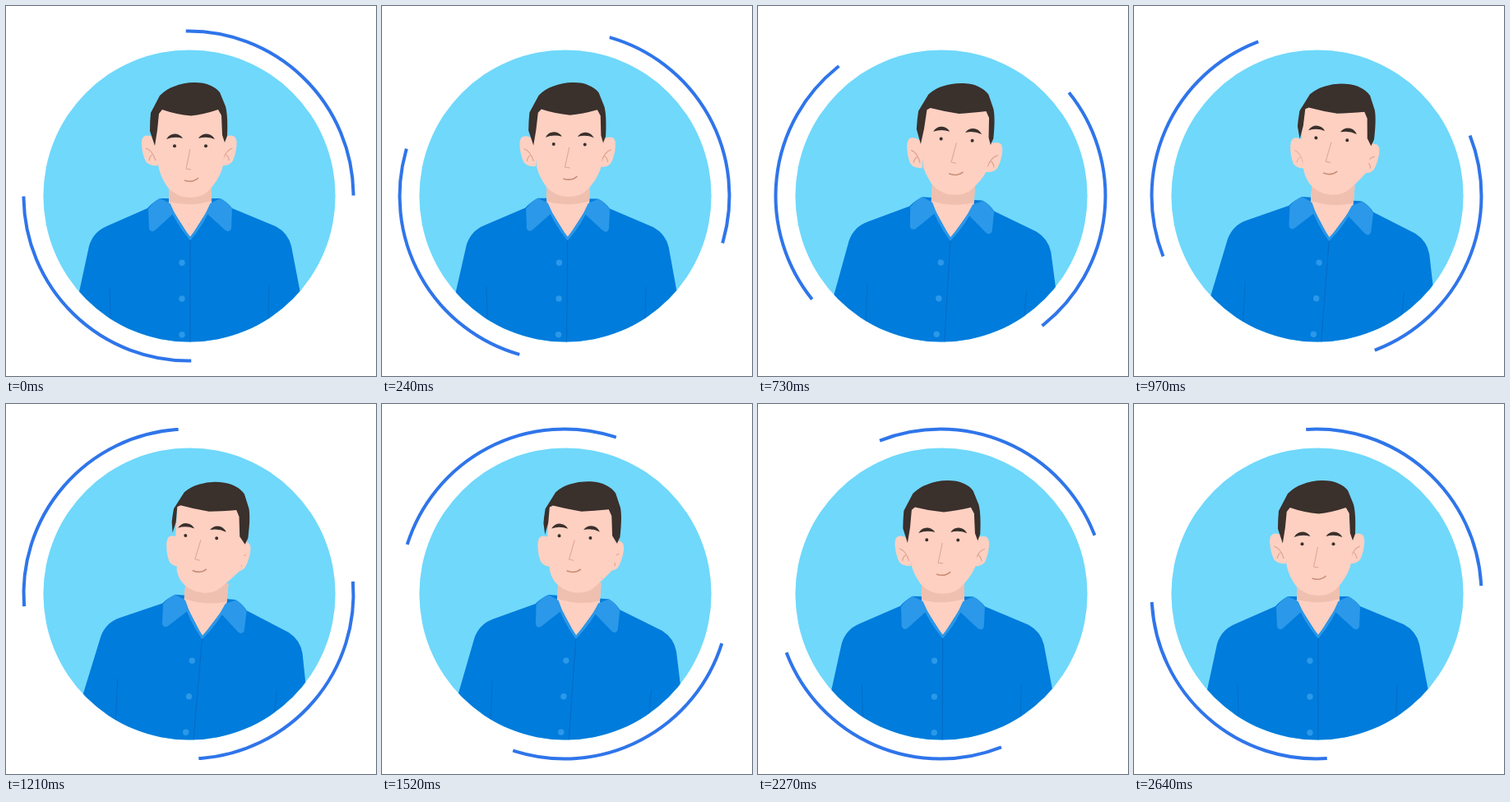
Recreate the animation shown at these times as an HTML page with a canvas. Size 450 by 450 pixels, loop 2.67 s.

```html
<!DOCTYPE html>
<html lang="en">
<head>
<meta charset="utf-8">
<title>Avatar</title>
<style>
  html, body { margin: 0; width: 100%; height: 100%; overflow: hidden; background: #fff; }
  canvas { display: block; width: 450px; height: 450px; }
</style>
</head>
<body>
<canvas id="stage" width="450" height="450"></canvas>
<script>
const ctx = document.getElementById('stage').getContext('2d');
const LOOP = 2670;
const TIMES = [0, 450, 730, 1210, 1850, 2270, 2640];
const COLOR = {
  sky: '#70d8fb', ring: '#2f75ea', shirt: '#007cdc', collar: '#2b98e9', seam: '#0669c4',
  skin: '#fdd0c1', shade: '#efbfaf', line: '#dda392', mouth: '#c98d78', hair: '#3a302c'
};

// Smooth curve through the values at TIMES, with given slopes at both ends.
function track(values, startSlope = 0, endSlope = 0) {
  const last = values.length - 1;
  const slopes = values.map((v, i) =>
    i === 0 ? startSlope :
    i === last ? endSlope :
    (values[i + 1] - values[i - 1]) / (TIMES[i + 1] - TIMES[i - 1]));
  return t => {
    if (t >= TIMES[last]) return values[last] + endSlope * (t - TIMES[last]);
    let i = 0;
    while (t >= TIMES[i + 1]) i++;
    const d = TIMES[i + 1] - TIMES[i], u = (t - TIMES[i]) / d, w = 1 - u;
    return w * w * (1 + 2 * u) * values[i] + u * u * (3 - 2 * u) * values[i + 1]
      + d * u * w * (w * slopes[i] - u * slopes[i + 1]);
  };
}

const ringAngle = track([-91, -59.4, -38.9, -4.4, 40.2, 68.3, 86.3], 0.07, 0.05);
const lean = track([0, 0.32, 0.68, 1, 0.48, 0.05, 0]);
const turnX = track([0, 1.5, 0.5, -12, -5, -1, -0.5]);
const turnY = track([0, -5, -8.3, -9, -8, -5, 0]);

const fill = (d, color) => {
  ctx.fillStyle = color;
  ctx.fill(new Path2D(d));
};
const stroke = (d, color, width) => {
  ctx.strokeStyle = color;
  ctx.lineWidth = width;
  ctx.stroke(new Path2D(d));
};
const dot = (x, y, r, color) => {
  ctx.fillStyle = color;
  ctx.beginPath();
  ctx.arc(x, y, r, 0, Math.PI * 2);
  ctx.fill();
};
const shifted = (x, y, draw) => {
  ctx.save();
  ctx.translate(x, y);
  draw();
  ctx.restore();
};
const mirrored = (axis, draw) => {
  ctx.save();
  ctx.translate(2 * axis, 0);
  ctx.scale(-1, 1);
  draw();
  ctx.restore();
};

function drawRing(degrees) {
  ctx.strokeStyle = COLOR.ring;
  ctx.lineWidth = 4;
  for (const offset of [0, 180]) {
    const start = (degrees + offset) * Math.PI / 180;
    ctx.beginPath();
    ctx.arc(222, 231, 200.5, start, start + 90.8 * Math.PI / 180);
    ctx.stroke();
  }
}

function drawFlap() {
  fill('M187 234 Q179 238 173 247 L174 271 Q176 276 181 273 L203 253 Q199 246 198 239 Z', COLOR.collar);
}

function drawBody() {
  fill('M198 234 L187 234 Q178 239 172 246 L122 268 Q106 275 101 292 L82 380 V460 H364 V380'
    + ' L347 292 Q343 276 328 268 L275 246 Q269 238 260 234 Z', COLOR.shirt);
  fill('M198 215 H250 V241 L224 282 L198 241 Z', COLOR.skin);
  fill('M198 215 V238 Q224 245 250 237 V215 Z', COLOR.shade);
  stroke('M198 240 Q208 264 224 283 Q240 264 250 240', COLOR.collar, 3);
  drawFlap();
  mirrored(224, drawFlap);
  stroke('M224 285 V420', COLOR.seam, 1);
  stroke('M126 342 L128 410 M320 340 L318 410', COLOR.seam, 0.8);
  for (const y of [312.3, 356, 399.7]) dot(214, y, 3.7, COLOR.collar);
}

function drawEar(lineAlpha) {
  fill('M184 164 Q177 156 169 158 Q164 160 165 170 Q166 181 170 189 Q174 195 185 194 Z', COLOR.skin);
  ctx.globalAlpha = lineAlpha;
  stroke('M170 173 Q178 175 182 188 M178 181 Q175 182 174 188', COLOR.line, 1.2);
  ctx.globalAlpha = 1;
}

function drawFeatures() {
  for (const x of [205, 243]) dot(x, 170.3, 2, COLOR.hair);
  fill('M195 162 Q199 155 206 155.5 Q212 156 215 161 Q205 158 195 162 Z', COLOR.hair);
  fill('M254 162 Q250 155 243 155.5 Q237 156 234 161 Q244 158 254 162 Z', COLOR.hair);
  stroke('M224 174 L219 198 L225 199', COLOR.line, 1);
  stroke('M217 212 Q227 215.5 234 209', COLOR.mouth, 1.6);
}

function drawHead(fx, fy) {
  const earY = -0.6 * fy;
  const leftLines = Math.max(0, Math.min(1, (fx + 10) / 6));
  shifted(-0.5 * fx, earY, () => drawEar(leftLines));
  shifted(0.6 * fx, earY, () => mirrored(222.7, () => drawEar(1)));

  const cx = 0.4 * fx, cy = 0.45 * fy;
  fill(`M180 125 H267 L268 165 L263 198 Q${258 + cx} ${213 + cy} ${246 + cx} ${225 + cy}`
    + ` Q${238 + cx} ${233 + cy} ${224 + cx} ${233 + cy}`
    + ` Q${208 + cx} ${233 + cy} ${197 + cx} ${221 + cy}`
    + ` Q${189 + cx} ${210 + cy} 186 198 L181 165 Z`, COLOR.skin);

  const hx = 0.5 * fx, hy = 0.4 * fy, sx = 0.33 * fx, sy = 0.9 * Math.min(0, fx);
  fill(`M${181 + sx} ${170 + sy} L175 ${152 + sy / 2} Q175 140 176 130 L187 109 Q195 101 204 98`
    + ' Q216 93 229 93 Q241 93 247 96 Q255 99 260 105 L267 122 Q270 133 269 158'
    + ` L266 166 L${263 + hx * 0.7} 157 L${262 + hx} 133 L${258 + hx} ${126 + hy * 0.2}`
    + ` Q${240 + hx} ${132 + hy} ${225 + hx} ${133.5 + hy}`
    + ` Q${207 + hx} ${132 + hy} ${190 + hx} ${126 + hy * 0.2}`
    + ` L${186 + hx} ${131 + hy} L${184 + sx} ${151 + sy / 2} Z`, COLOR.hair);

  shifted(fx, fy, drawFeatures);
}

function draw(t) {
  ctx.fillStyle = '#fff';
  ctx.fillRect(0, 0, 450, 450);
  drawRing(ringAngle(t));
  dot(223, 231, 177.6, COLOR.sky);

  ctx.save();
  ctx.beginPath();
  ctx.arc(223, 231, 177.6, 0, Math.PI * 2);
  ctx.clip();
  ctx.translate(222, 455);
  ctx.rotate(0.086 * lean(t));
  ctx.translate(-222, -455);
  drawBody();
  drawHead(turnX(t), turnY(t));
  ctx.restore();
}

function tick() {
  draw(performance.now() % LOOP);
  requestAnimationFrame(tick);
}
tick();
</script>
</body>
</html>
```
